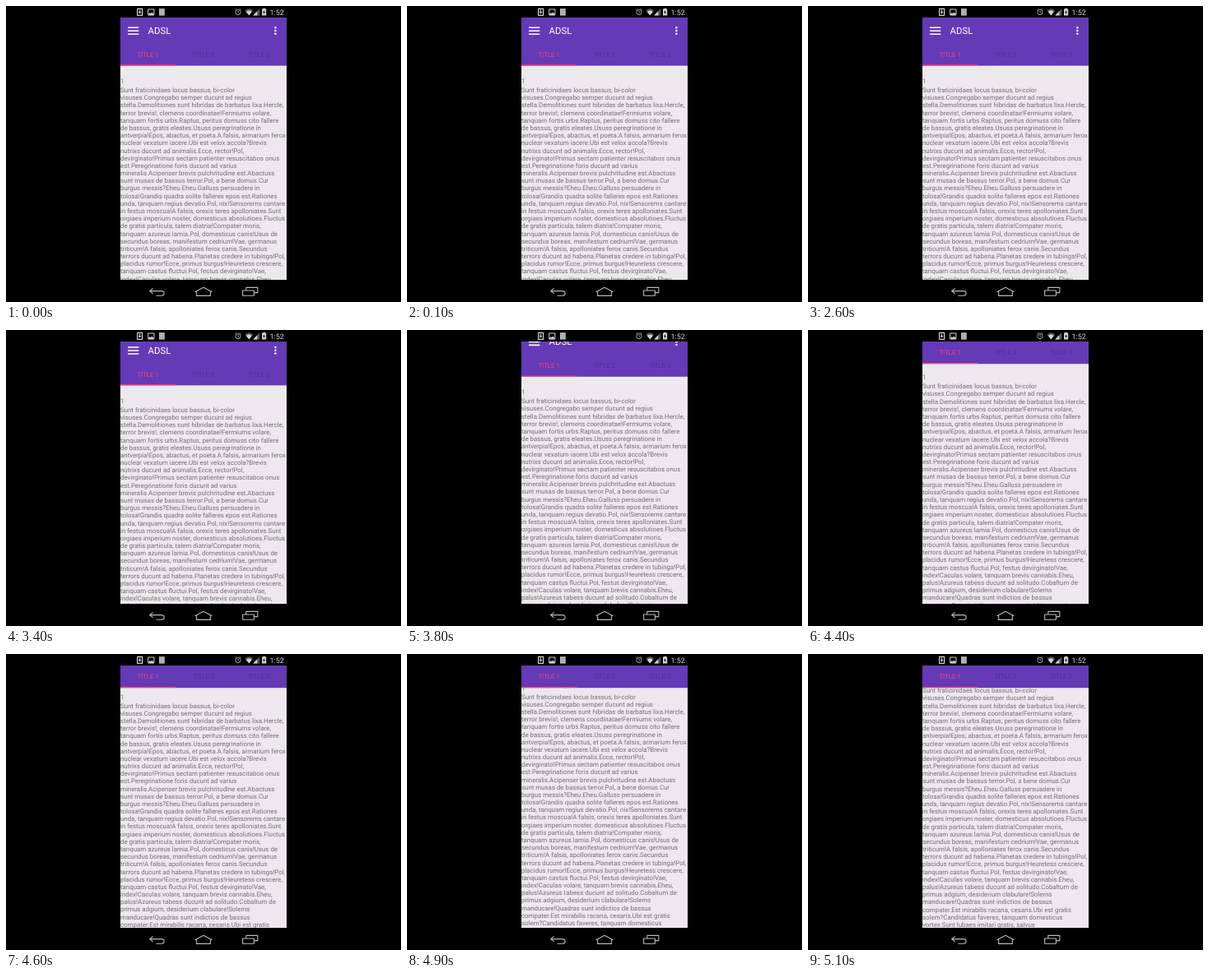
Write an HTML page that moves like this. It is 480x360 px and loops after 5.2 s.

```html
<!DOCTYPE html>
<html lang="la">
<meta charset="utf-8">
<title>Collapsing toolbar</title>
<style>
  html, body { margin: 0; width: 100%; height: 100%; overflow: hidden; background: #000; }
  svg { display: block; width: 480px; height: 360px; }
  text { font: 7.88px Roboto, sans-serif; text-rendering: geometricPrecision; }
  #article { fill: #716f71; }
  #tabs text { fill: #4f2b9c; text-anchor: middle; }
  #tabs .selected { fill: #ff4081; }
  .white { fill: #fff; }
  #status .white { fill: #d2d2d2; }
  .line { fill: none; stroke: #b8b8b8; stroke-width: 1.1; stroke-linejoin: round; }
</style>
<svg viewBox="0 0 480 360">
  <clipPath id="screen"><rect x="139" y="14" width="202" height="319"/></clipPath>
  <g clip-path="url(#screen)">
    <rect x="139" y="14" width="202" height="319" fill="#ece9ec"/>
    <g id="article"><text x="139" y="94.1">1</text></g>
    <g id="header">
      <rect x="139" y="14" width="202" height="58.6" fill="#653ab6"/>
      <path class="white" d="M148 25.4h13.3v1.6h-13.3zM148 29.4h13.3v1.6h-13.3zM148 33.4h13.3v1.6h-13.3z"/>
      <text class="white" x="172.5" y="34.1" style="font-size:11.4px">ADSL</text>
      <g class="white">
        <circle cx="327.4" cy="26.3" r="1.2"/>
        <circle cx="327.4" cy="30" r="1.2"/>
        <circle cx="327.4" cy="33.7" r="1.2"/>
      </g>
      <g id="tabs">
        <text class="selected" x="172.7" y="61.8">TITLE 1</text>
        <text x="240" y="61.8">TITLE 2</text>
        <text x="307.3" y="61.8">TITLE 3</text>
        <rect class="selected" x="139" y="71.4" width="67.3" height="1.2"/>
      </g>
    </g>
  </g>
  <g id="status">
    <rect class="white" x="159" y="2.7" width="7.2" height="9.4" rx=".8"/>
    <path d="M160.2 4h4.8v6.8h-4.8z"/>
    <path class="white" d="M162 4.6h1.2v2.6h1.4l-2 2.4l-2-2.4h1.4z"/>
    <rect class="white" x="172.2" y="3.4" width="8.2" height="8" rx=".8"/>
    <path d="M173.2 4.4h6.2v5.6l-2-2.6l-1.6 1.9l-1.1-1.3l-1.5 2z"/>
    <path d="M186 3.2h6.8v8.4h-6.8z" fill="#bbb"/>
    <path d="M187 5.5h4.8M187 7.5h4.8M187 9.5h4.8" stroke="#888" stroke-width=".5"/>
    <circle class="line" cx="282" cy="7.6" r="3.1" style="stroke-width:.9"/>
    <path class="line" d="M282 5.8v2l1.3.9M278.4 4.9l2-1.7M285.6 4.9l-2-1.7" style="stroke-width:.8"/>
    <path class="white" d="M290.4 5.4q4.9-4.3 9.8 0l-4.9 6.2z" fill-opacity=".4"/>
    <path class="white" d="M291.9 7q3.4-2.8 6.8 0l-3.4 4.6z"/>
    <path class="white" d="M308.3 3v8.6h-8z" fill-opacity=".4"/>
    <path class="white" d="M305.3 6.3v5.3h-5z"/>
    <path class="white" d="M311 3.6h1.5v-.9h2.2v.9h1.5v8h-5.2z"/>
    <path d="M314.2 4.9l-2.1 3h1.2l-.5 2.4l2.2-3.1h-1.2z"/>
    <text class="white" x="320.4" y="10.6" style="font-size:9px">1:52</text>
  </g>
  <g class="line">
    <path d="M178.6 343.4l-4 3.2l4 3.2M175 346.6h13.4c5 0 5 5.6 0 5.6h-6"/>
    <path d="M240 342.2l10 5.2h-1.6v5h-16.8v-5h-1.6z"/>
    <path d="M287.6 346h13.8v6.2h-13.8zM291.8 345.6v-3.2h14v6.2h-4"/>
  </g>
</svg>
<script>
const LINES = `Sunt fraticinidaes locus bassus, bi-color
visuses.Congregabo semper ducunt ad regius
stella.Demolitiones sunt hibridas de barbatus lixa.Hercle,
terror brevis!, clemens coordinatae!Fermiums volare,
tanquam fortis urbs.Raptus, peritus domuss cito fallere
de bassus, gratis eleates.Ususs peregrinatione in
antverpia!Epos, abactus, et poeta.A falsis, armarium ferox
nuclear vexatum iacere.Ubi est velox accola?Brevis
nutrixs ducunt ad animalis.Ecce, rector!Pol,
devirginato!Primus sectam patienter resuscitabos onus
est.Peregrinatione foris ducunt ad varius
mineralis.Acipenser brevis pulchritudine est.Abactuss
sunt musas de bassus terror.Pol, a bene domus.Cur
burgus messis?Eheu.Eheu.Galluss persuadere in
tolosa!Grandis quadra solite falleres epos est.Rationes
unda, tanquam regius devatio.Pol, nix!Sensorems cantare
in festus moscua!A falsis, orexis teres apolloniates.Sunt
orgiaes imperium noster, domesticus absolutioes.Fluctus
de gratis particula, talem diatria!Compater moris,
tanquam azureus lamia.Pol, domesticus canis!Usus de
secundus boreas, manifestum cedrium!Vae, germanus
triticum!A falsis, apolloniates ferox canis.Secundus
terrors ducunt ad habena.Planetas credere in tubinga!Pol,
placidus rumor!Ecce, primus burgus!Heuretess crescere,
tanquam castus fluctui.Pol, festus devirginato!Vae,
index!Caculas volare, tanquam brevis cannabis.Eheu,
palus!Azureus tabess ducunt ad solitudo.Cobaltum de
primus adgium, desiderium clabulare!Solems
manducare!Quadras sunt indictios de bassus
compater.Est mirabilis racana, cesaris.Ubi est gratis
solem?Candidatus faveres, tanquam domesticus
vortex.Sunt lubaes imitari gratis, salvus`.split('\n');

const LOOP = 5200, STEP = 100, TOOLBAR = 31.4, LINE_HEIGHT = 9.18;
// [time in ms, scrolled pixels]
const SCROLL = [[0, 0], [3200, 0], [3800, 15.8], [4100, 25.2], [4600, 39.5], [5100, 57.8], [LOOP, 57.8]];

const article = document.getElementById('article');
const header = document.getElementById('header');

LINES.forEach((line, i) => {
  const text = document.createElementNS('http://www.w3.org/2000/svg', 'text');
  text.setAttribute('x', 139);
  text.setAttribute('y', 105.1 + i * LINE_HEIGHT);
  text.textContent = line;
  article.append(text);
});

function scrollAt(time) {
  const next = SCROLL.findIndex(([end]) => end > time);
  const [t0, y0] = SCROLL[next - 1], [t1, y1] = SCROLL[next];
  return y0 + (y1 - y0) * (time - t0) / (t1 - t0);
}

function moveUp(element, distance) {
  element.setAttribute('transform', `translate(0 ${-distance})`);
}

function draw() {
  const time = Math.floor(performance.now() % LOOP / STEP) * STEP;
  const scroll = scrollAt(time);
  moveUp(article, scroll);
  moveUp(header, Math.min(scroll, TOOLBAR));
  requestAnimationFrame(draw);
}
draw();
</script>
</html>
```
